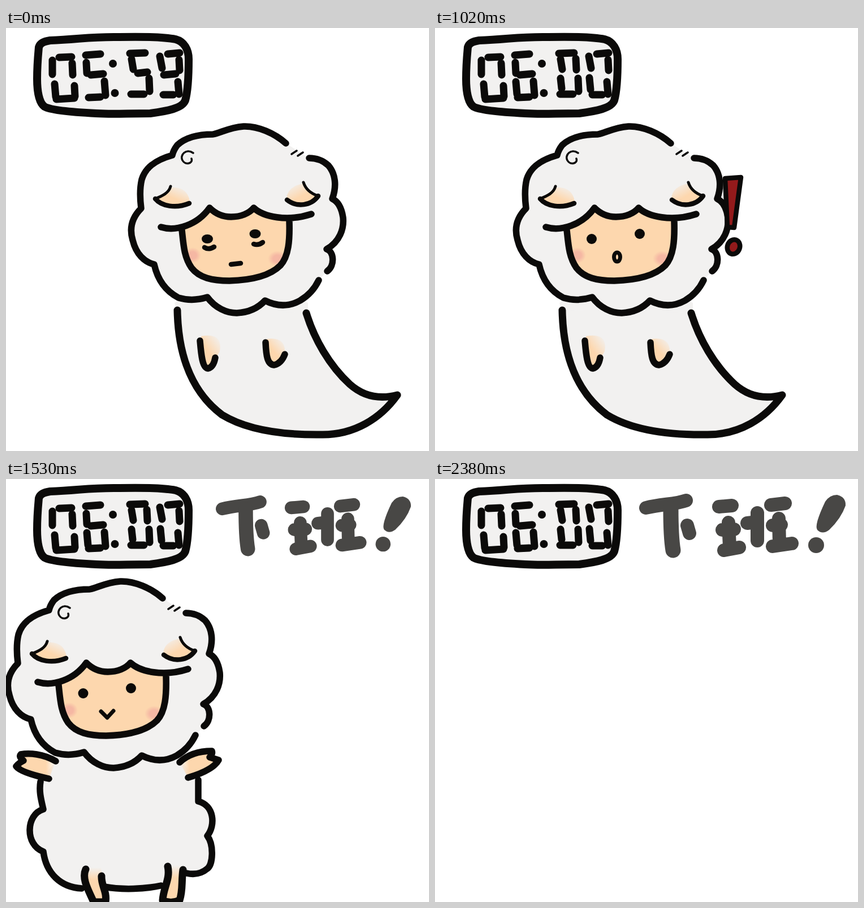
Write an HTML page that moves like this. It is 748 px wide and 748 px high and loops after 2.55 s.

```html
<!DOCTYPE html>
<html lang="zh">
<head>
<meta charset="utf-8">
<title>Off work</title>
<style>
  html, body { margin: 0; width: 100%; height: 100%; overflow: hidden; background: #fff; }
  svg { display: block; width: 100%; height: 100%; }
  .ink { fill: none; stroke: #0b0a09; stroke-width: 11.5; stroke-linecap: round; stroke-linejoin: round; }
  .thick { stroke-width: 13; }
  .medium { stroke-width: 8.5; }
  .thin { stroke-width: 3.5; }
  .wool { fill: #f2f1f0; }
  .skin { fill: #fdd7ae; }
  .dot { fill: #0b0a09; }
</style>
</head>
<body>
<svg viewBox="0 0 748 748">
  <defs>
    <linearGradient id="fadeRight" x1=".45" y1=".55" x2=".9" y2="0">
      <stop stop-color="#fdd7ae"/><stop offset="1" stop-color="#fdd7ae" stop-opacity="0"/>
    </linearGradient>
    <linearGradient id="fadeLeft" href="#fadeRight" x1=".55" x2=".1"/>
    <linearGradient id="armLeft" href="#fadeRight" x1=".75" y1="0" x2="1" y2="0"/>
    <linearGradient id="armRight" href="#fadeRight" x1=".25" y1="0" x2="0" y2="0"/>
    <linearGradient id="leg" href="#fadeRight" x1="0" y1=".35" x2="0" y2="0"/>
    <radialGradient id="blush">
      <stop offset=".45" stop-color="#f5b7a3"/><stop offset="1" stop-color="#f5b7a3" stop-opacity="0"/>
    </radialGradient>
  </defs>

  <g id="figure">
    <g id="ghost">
      <path class="wool" d="M298 486L330 470H500L534 486V506H303Z"/>
      <path id="tail" class="ink wool thick"/>
      <path fill="url(#fadeRight)" d="M345 545Q384 538 378 572L367 590L357 600Q347 590 345 545Z"/>
      <path fill="url(#fadeRight)" d="M461 550Q496 545 493 577L475 594Q463 588 461 550Z"/>
      <path class="ink" d="M343 553C345 576 347 601 357 602Q367 600 370 583M459 556C460 579 462 595 474 596Q487 593 493 577"/>
    </g>

    <g id="sheep" transform="translate(134)">
      <path class="wool" d="M145 525L172 492L170 470H395V494L424 525V563C450 570 455 605 440 624C452 640 450 675 440 682Q425 695 403 690L358 712C330 718 290 720 258 714L218 717C180 715 155 690 150 652C118 630 125 590 150 579Z"/>
      <path class="ink" d="M145 528C142 545 146 560 150 577C119 586 117 640 150 652C155 690 180 715 218 717M258 714C290 720 330 718 358 712M424 525V563C452 570 455 605 440 624C452 640 450 675 440 682Q425 695 403 690"/>
      <path fill="url(#armLeft)" d="M172 492C150 479 125 477 110 480Q106 484 115 491L102 501Q110 512 160 523Z"/>
      <path class="ink" d="M172 492C150 479 125 477 110 480Q106 484 115 491Q108 494 102 501Q110 512 160 523"/>
      <path fill="url(#armRight)" d="M391 494C408 478 428 474 448 474L444 484L460 490Q450 508 406 521Z"/>
      <path class="ink" d="M391 494C408 478 428 474 448 474Q450 479 444 485L460 490Q450 508 406 521"/>
      <path fill="url(#leg)" d="M226 680H252L260 740H238L224 700Z"/>
      <path fill="url(#leg)" d="M370 676H396L390 740H362L370 705Z"/>
      <path class="ink thick" d="M225 683C217 700 231 722 239 741H260C263 722 252 712 253 695M370 678C375 700 362 716 361 738Q375 745 391 738C397 720 394 705 397 684"/>
    </g>

    <g id="head">
      <path class="wool" d="M495 204C475 186 445 173 420 174C395 176 380 185 366 188C340 188 318 193 303 207L294 225C262 234 246 248 240 268C236 285 237 303 239 319C222 336 218 355 224 375C230 400 245 414 262 418C268 445 282 465 305 477C322 482 340 481 356 476C370 495 390 504 408 504C428 503 446 495 458 482C480 493 500 493 520 482Q547 466 553 446L568 430C582 420 580 395 567 391C590 378 598 355 596 335Q592 309 577 302C585 280 583 258 570 243Q556 230 536 230Z"/>
      <path class="ink" d="M495 204C475 186 445 173 420 174C395 176 380 185 366 188C340 188 318 193 303 207Q296 216 294 225C262 234 246 248 240 268C236 285 237 303 239 319C222 336 218 355 224 375C230 400 245 414 262 418C268 445 282 465 305 477C322 482 340 481 356 476C370 495 390 504 408 504C428 503 446 495 458 482C480 493 500 493 520 482Q542 469 553 446M568 430C582 420 580 395 567 391C590 378 598 355 596 335Q592 309 577 302C585 280 583 258 570 243Q556 230 536 230"/>
      <path class="ink thin" d="M331 221C318 212 307 225 312 234C317 243 331 240 328 231M505 223L514 217M516 226L525 220"/>

      <path fill="url(#fadeRight)" d="M264 302Q287 295 291 282Q320 280 325 306C300 320 275 312 264 302Z"/>
      <path fill="url(#fadeLeft)" d="M552 297Q530 288 526 275Q498 280 496 301C515 318 540 312 552 297Z"/>
      <path class="ink medium" d="M264 302C275 315 300 320 324 310M552 297C540 314 515 318 497 304"/>
      <path class="ink" style="stroke-width:5" d="M291 280C288 292 276 297 264 302M526 273C530 286 540 293 552 297"/>

      <path class="skin" d="M311 353Q342 344 360 318C372 330 385 334 398 334C415 334 430 328 438 318Q460 336 502 337C502 375 500 404 485 420C465 440 430 446 395 447C365 447 342 442 328 424C315 405 314 385 311 353Z"/>
      <ellipse fill="url(#blush)" cx="330" cy="402" rx="15" ry="14"/>
      <ellipse fill="url(#blush)" cx="480" cy="408" rx="17" ry="14"/>
      <path class="ink" d="M274 352C300 360 338 349 360 318C372 330 385 334 398 334C415 334 430 328 438 318C455 334 497 343 540 329M311 357C314 385 315 405 328 424C342 442 365 447 395 447C430 446 465 440 485 420C500 404 502 375 501 342"/>

      <g id="sleepy">
        <ellipse class="dot" cx="356" cy="373" rx="10" ry="8"/>
        <ellipse class="dot" cx="440.5" cy="364" rx="10" ry="8"/>
        <path class="ink medium" d="M351 388Q358 393 368 387M438 382Q446 385 454 379M398 418L415 416"/>
      </g>
      <g id="startled">
        <circle class="dot" cx="355" cy="373" r="9"/>
        <circle class="dot" cx="440" cy="364" r="9"/>
        <ellipse class="ink skin" style="stroke-width:7" cx="400" cy="405" rx="5.5" ry="8"/>
      </g>
      <g id="happy">
        <circle class="dot" cx="354.5" cy="372" r="9"/>
        <circle class="dot" cx="439" cy="363" r="9"/>
        <path class="ink" style="stroke-width:7" d="M386 404L397 415L408 403"/>
      </g>
    </g>
  </g>

  <g id="alert" class="ink medium" style="fill:#931a1b">
    <path d="M513 266L541 264L529 353L517 352Z"/>
    <ellipse cx="528" cy="387" rx="11" ry="13" transform="rotate(20 528 387)"/>
  </g>

  <g id="clock">
    <path class="ink wool" style="stroke-width:14" d="M58 34C60 27 66 24 78 22C130 20 150 15 200 16C250 15 285 17 300 20C315 24 323 38 323 55C323 85 322 110 317 128C312 142 285 147 255 151C210 151 190 153 160 151C120 149 80 146 68 139C58 132 55 110 55 90C55 65 57 45 58 34Z"/>
    <circle class="dot" cx="189" cy="63" r="7"/>
    <circle class="dot" cx="192.5" cy="115" r="7"/>
    <path class="ink thick" d="M94 52L116 51M82 57V82M117 62L118 83M86 99L88 122M89 126L121 124M121 102L122 121
      M141 48L167 46M142 61L143 80M150 83L172 81M174 94L176 119M146 123L167 122
      M219 45L246 44M222 55L225 73M253 89L254 112M221 117L244 117
      M286 46L307 44M272 50L276 71M306 56L307 75M304 95L306 117M278 118L296 118"/>
    <path id="before" class="ink thick" d="M233 80L250 78M279 83L300 81"/>
    <path id="after" class="ink thick" d="M143 95L145 117M249 54L250 74M222 89L224 107M273 88L275 109"/>
  </g>

  <g id="shout" fill="none" stroke="#484745" stroke-width="24" stroke-linecap="round" stroke-linejoin="round">
    <path d="M373 51C400 44 425 45 444 38M446 82L450 96
      M502 49L525 47M508 90L529 89M519 77L521 120M511 126L538 121
      M552 78L570 76M570 60V109
      M594 46L619 43M597 82L612 81M608 70L609 115M597 119L631 114"/>
    <path stroke-width="27" d="M417 52C417 80 418 108 421 126"/>
    <path fill="#484745" stroke="none" d="M690 40Q698 28 711 28Q727 32 726 47Q718 70 697 90Q685 99 676 90Q670 82 690 40Z"/>
    <circle fill="#484745" stroke="none" cx="674" cy="117" r="14"/>
  </g>
</svg>

<script>
const STEP = 170, COUNT = 15, CHEER = 7, RING = 4;
const ghostX = [0, -14, -32, -52, -78, -78, -78];
const sheepX = [37, 0, -84, -139, -197, -255, -408];
const sheepY = [-4, 0, 7, 14, 15, 16, 17];
const $ = id => document.getElementById(id);
const show = (id, on) => $(id).style.display = on ? '' : 'none';
const move = (id, x, y) => $(id).setAttribute('transform', `translate(${x} ${y})`);

// lift raises the tip of the tail
const tailPath = lift => `M303 499C304 558 318 636 382 684C428 712 495 720 560 719
  C616 719 662 ${691 - lift / 4} 692 ${649 - lift}
  C665 ${656 - lift} 635 ${654 - lift / 2} 608 ${630 - lift / 3}C572 597 545 550 531 504`;

function draw(now) {
  const step = Math.floor(now / STEP) % COUNT;
  const odd = step % 2, cheer = step >= CHEER, ring = step >= RING;
  const bob = odd && !ring;

  if (cheer) {
    const i = Math.min(step - CHEER, sheepX.length - 1);
    move('figure', sheepX[i] - 134, sheepY[i]);
  } else {
    move('figure', ghostX[step], bob ? -4 : 0);
  }
  $('tail').setAttribute('d', tailPath(bob ? 10 : 0));
  move('clock', bob ? 1 : 0, 0);

  show('figure', step < COUNT - 1);
  show('ghost', !cheer);
  show('sheep', cheer);
  show('sleepy', !ring);
  show('startled', ring && !cheer);
  show('alert', ring && !cheer);
  show('happy', cheer);
  show('before', !ring);
  show('after', ring);
  show('shout', cheer);
  const size = odd ? 0.945 : 1;
  $('shout').setAttribute('transform', `translate(543 83) scale(${size}) translate(-543 -83)`);
}

const start = performance.now();
(function loop() {
  draw(performance.now() - start);
  requestAnimationFrame(loop);
})();
</script>
</body>
</html>
```
